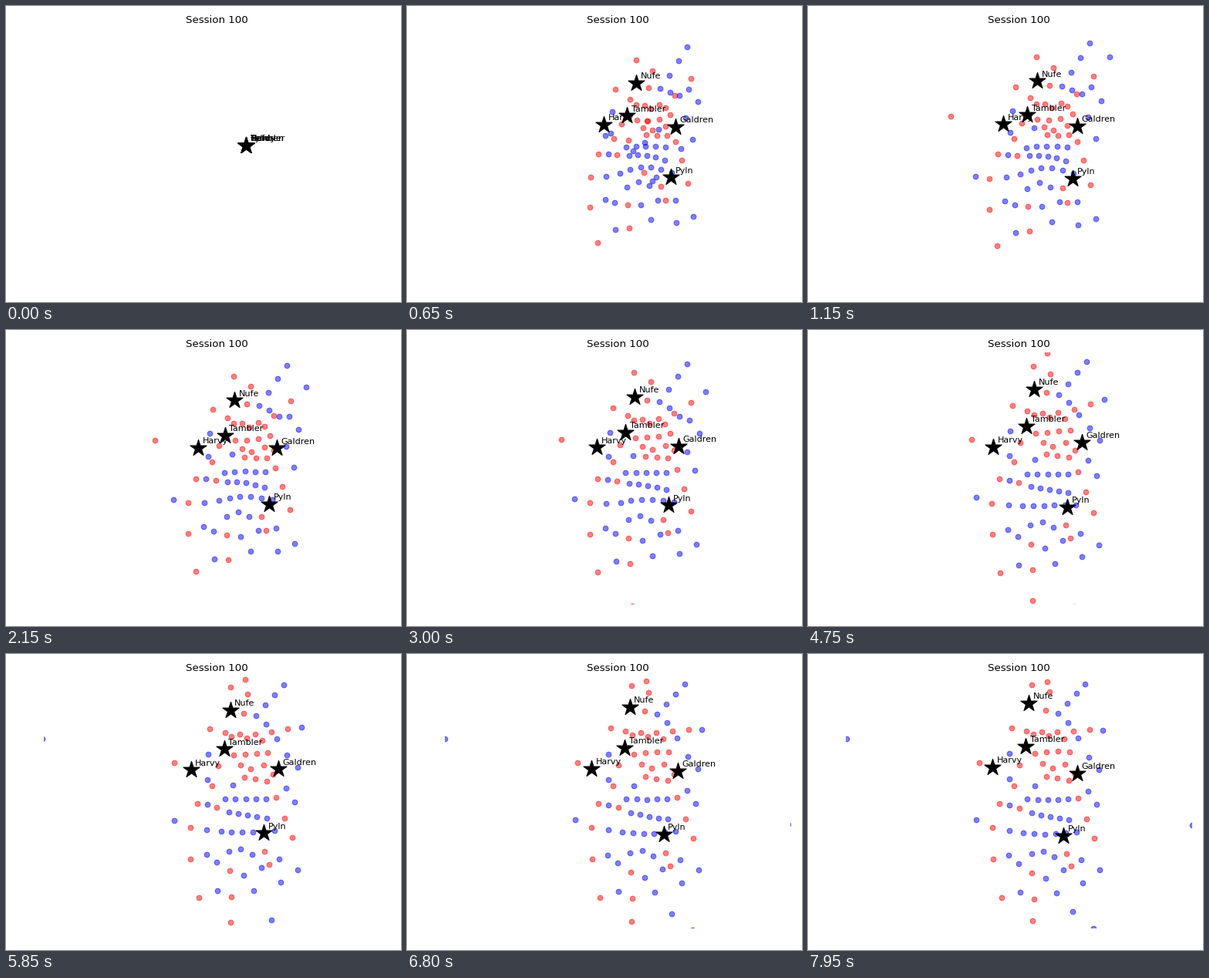
Recreate the animation shown at these times as a matplotlib script. Size 512 by 384 pixels, loop 8 s.

```python
import numpy as np
import matplotlib.pyplot as plt
from matplotlib.animation import FuncAnimation

W, H, DPI = 512, 384, 80
LEFT, RIGHT, TOP, BOTTOM = 49.4, 497.4, 29, 355
STEP, FRAMES = 50, 160
CENTER = np.array([311, 181])
EARLY, MIDDLE, LATE = 1150, 4750, 7950

# Chains of evenly spaced dots: count, then two or three points of the curve.
RED_CHAINS = [
    (3, (292, 47), (314, 57), (309, 81)),
    (6, (265, 98), (314, 108), (366, 96)),
    (3, (293, 110), (333, 115)),
    (4, (295, 134), (340, 130)),
    (3, (275, 146), (334, 146)),
    (2, (317, 151), (346, 156)),
    (3, (309, 161), (338, 165)),
    (5, (267, 171), (238, 225), (249, 315)),
    (3, (273, 198), (289, 278), (291, 311)),
    (3, (350, 184), (370, 237)),
    (2, (334, 253), (340, 270)),
]
BLUE_CHAINS = [
    (4, (361, 41), (325, 84)),
    (4, (338, 94), (378, 143)),
    (2, (363, 169), (374, 189)),
    (5, (262, 131), (259, 259)),
    (5, (284, 187), (337, 187)),
    (5, (289, 203), (337, 211)),
    (6, (278, 228), (347, 227)),
    (4, (272, 268), (296, 250), (318, 256)),
    (3, (307, 283), (353, 264)),
    (4, (273, 305), (339, 299), (377, 279)),
]

# Outliers: where the burst throws them and where they drift to.
RED_OUTLIERS = [
    ((185, 143), (222, 141)),
    ((309, 12), (310, 36)),
    ((292, 366), (291, 346)),
]
BLUE_OUTLIERS = [
    ((391, 66), (382, 99)),
    ((217, 221), (218, 215)),
    ((293, 158), (294, 171)),
    ((350, 430), (343, 334)),
    ((374, 400), (370, 356)),
    ((22, 109), (50, 110)),
    ((545, 200), (498, 222)),
]

# Early, middle and late place of each star.
STARS = {
    "Nufe": ((297, 97), (293, 77), (286, 64)),
    "Tambler": ((284, 141), (283, 125), (282, 120)),
    "Harvy": ((253, 153), (240, 152), (239, 147)),
    "Galdren": ((349, 156), (355, 146), (349, 155)),
    "Pyln": ((343, 224), (336, 230), (331, 236)),
}


def chain(n, *keys):
    """n dots along the line or parabola through the key points."""
    keys = np.array(keys, float)
    u = np.linspace(0, 1, len(keys))
    s = np.linspace(0, 1, n)
    return np.column_stack([np.polyval(np.polyfit(u, k, len(keys) - 1), s)
                            for k in keys.T])


def field(p):
    """Total drift: the core stretches upright, the right flank sinks."""
    x, y = p.T
    core = np.exp(-((x - 312) / 45) ** 2)
    flank = np.exp(-((x - 368) / 16) ** 2 - ((y - 150) / 50) ** 2)
    dx = 6 * np.tanh((y - 170) / 60)
    dy = 32 * core * np.tanh((y - 175) / 55) + 45 * flank
    return np.column_stack([dx, dy])


def progress(t):
    u = np.clip((t - EARLY) / (LATE - EARLY), 0, 1)
    return np.sin(np.pi / 2 * u)


def burst(target, share):
    return CENTER + (target - CENTER) * share


def quick(t):
    return 1 - np.exp(-max(t - STEP, 0) / 180)


def slow(t):
    return np.clip((t - STEP) / 1050, 0, 1) ** 3


def party_at(base, outliers, t):
    crowd = base + field(base) * (progress(t) - progress(MIDDLE))
    away, late = outliers.transpose(1, 0, 2)
    far = away + (late - away) * progress(t)
    return np.vstack([burst(crowd, quick(t)), burst(far, slow(t))])


def stars_at(t):
    spots = [[np.interp(t, (EARLY, MIDDLE, LATE), axis) for axis in zip(*path)]
             for path in STARS.values()]
    return burst(np.array(spots), quick(t))


fig = plt.figure(figsize=(W / DPI, H / DPI), dpi=DPI, facecolor="white")
ax = fig.add_axes([LEFT / W, 1 - BOTTOM / H,
                   (RIGHT - LEFT) / W, (BOTTOM - TOP) / H])
ax.set_xlim(LEFT, RIGHT)
ax.set_ylim(BOTTOM, TOP)
ax.axis("off")
ax.set_title("Session 100", fontsize=12)

parties = []
for color, chains, outliers in (("red", RED_CHAINS, RED_OUTLIERS),
                                ("blue", BLUE_CHAINS, BLUE_OUTLIERS)):
    dots = ax.scatter([], [], s=36, color=color, alpha=0.5)
    base = np.vstack([chain(*c) for c in chains])
    parties.append((dots, base, np.array(outliers, float)))

stars = ax.scatter([], [], s=400, marker="*", color="black", zorder=3)
labels = [ax.annotate(name, CENTER, xytext=(5, 5), fontsize=10, zorder=4,
                      textcoords="offset points") for name in STARS]


def draw(i):
    t = i * STEP
    for dots, base, outliers in parties:
        dots.set_offsets(party_at(base, outliers, t))
    spots = stars_at(t)
    stars.set_offsets(spots)
    for label, spot in zip(labels, spots):
        label.xy = tuple(spot)
    return [*(p[0] for p in parties), stars, *labels]


anim = FuncAnimation(fig, draw, frames=FRAMES, interval=STEP,
                     repeat=True, repeat_delay=0)
plt.show()
```
